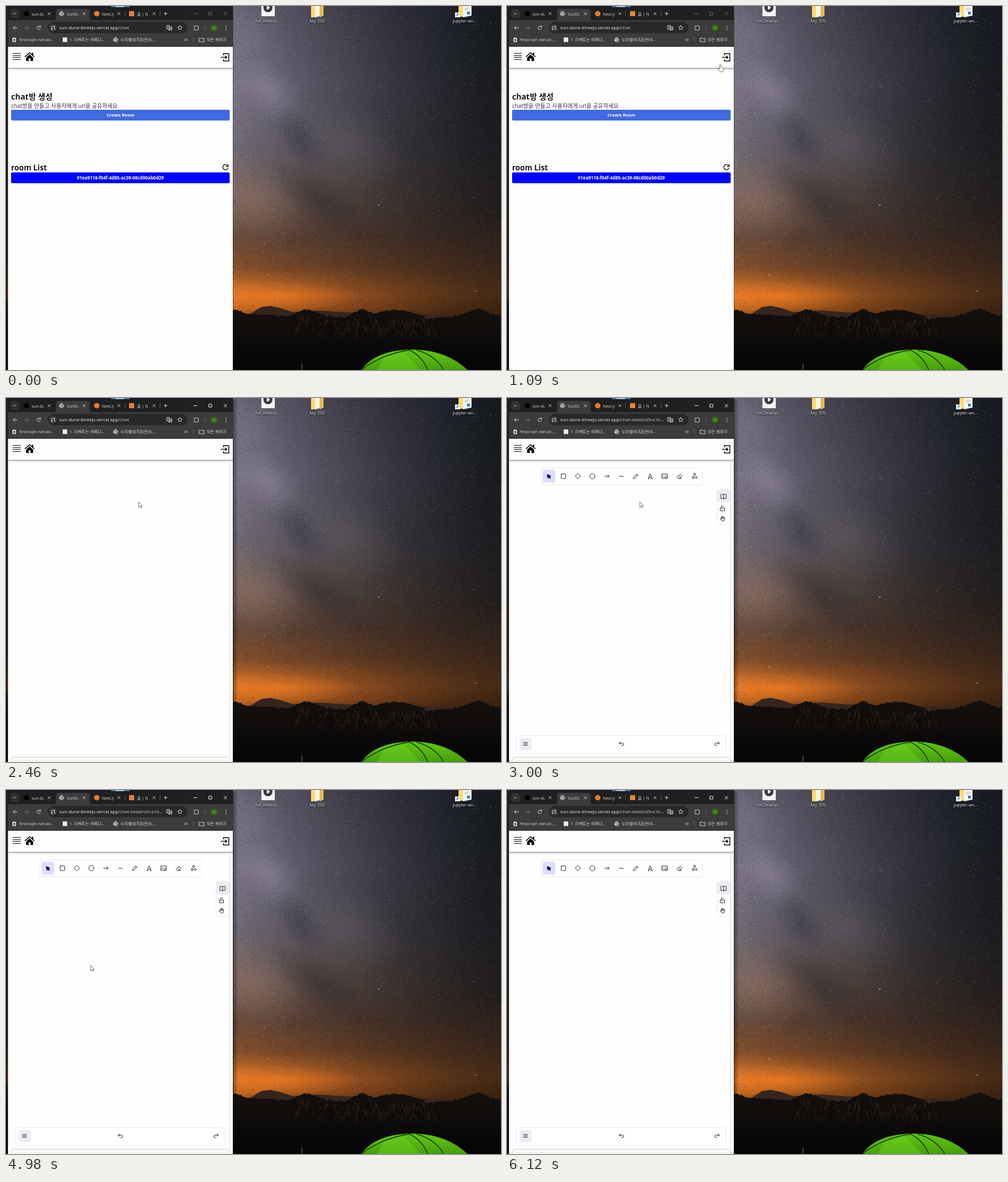
Animation of 873x642 px, one loop 8000 ms. Source, as an HTML page with a canvas:

```html
<!DOCTYPE html>
<html lang="ko">
<head>
<meta charset="utf-8">
<title>Chat room whiteboard</title>
<style>
html, body { margin: 0; width: 100%; height: 100%; overflow: hidden; background: #0b0c10; }
canvas, svg { position: absolute; left: 0; top: 0; width: 873px; height: 642px; }
text { font-family: "Open Sans", "Noto Sans CJK KR", "Noto Sans CJK", sans-serif; white-space: pre; }
.line { fill: none; stroke-linecap: round; stroke-linejoin: round; }
.mid { text-anchor: middle; }
.bold { font-weight: 700; }
.tab { font-size: 7.2px; fill: #d8d8d8; }
.label { font-size: 7.3px; fill: #fff; text-anchor: middle; text-shadow: 0 1px 1px #000, 0 0 2px #000; }
.card { fill: #fff; filter: drop-shadow(0 .5px 1.2px #0003); }
</style>
</head>
<body>
<canvas id="wallpaper" width="873" height="642"></canvas>
<svg viewBox="0 0 873 642">
  <defs>
    <linearGradient id="edge"><stop stop-color="#000" stop-opacity=".4"/><stop offset="1" stop-color="#000" stop-opacity="0"/></linearGradient>
    <linearGradient id="drop" x2="0" y2="1"><stop stop-color="#8a8a8a"/><stop offset=".3" stop-color="#c4c4c4"/><stop offset="1" stop-color="#fefefe"/></linearGradient>
    <clipPath id="tabA"><rect x="44" y="5" width="23" height="18"/></clipPath>
    <clipPath id="tabB"><rect x="106" y="5" width="22" height="18"/></clipPath>
    <clipPath id="tabC"><rect x="168" y="5" width="22" height="18"/></clipPath>
    <clipPath id="tabD"><rect x="230" y="5" width="21" height="18"/></clipPath>
    <g id="close" class="line" stroke="#d4d4d4"><path d="M-2-2L2 2M2-2L-2 2"/></g>
    <g id="globe"><circle r="4.3" fill="#c9cbd0"/><path d="M-3.5-1C-1-3 0 0 2-1S3-3 1-4M-2 3.5C-1 1 2 3 3.5 1" class="line" stroke="#55585d" stroke-width="1.2"/></g>
  </defs>

  <!-- desktop -->
  <path d="M450.500 0H474V18H450.500Z" fill="#f5f5f5"/>
  <circle cx="462" cy="3" r="8" fill="#343a43"/><path d="M460-1L466 3L460 7Z" fill="#fff"/>
  <path d="M538 0H546V20H538Z" fill="#ffd869"/><path d="M545 0H558V17L545 20Z" fill="#f4f4f1"/><path d="M553 0H560V17L553 20Z" fill="#e9bd4f"/>
  <path d="M798 0H807V19H798Z" fill="#ffd869"/><path d="M806 0H821V17L806 20Z" fill="#f4f4f1"/>
  <rect x="813" y="10" width="5" height="5" fill="#2584d0"/><path d="M809 4H817M809 7H815" stroke="#9aa"/>
  <rect x="792" y="11.500" width="8.500" height="8.500" fill="#fff"/><path d="M794 18Q794 14.500 798 14.500M796 12.700L798.500 14.500L796 16.500" class="line" stroke="#1769c0"/>
  <text class="label" x="462" y="29">file_exampl...</text>
  <text class="label" x="549" y="29">key 관리</text>
  <text class="label" x="809" y="29">jupyter-wo...</text>
  <path d="M185 0H218V2H185Z" fill="#3b78b5"/><path d="M193 0H208V2H193Z" fill="#a9c8e4"/>
  <rect id="shade" x="400" y="2" width="9" height="537" fill="url(#edge)"/>

  <!-- browser -->
  <rect x="3.500" y="2" width="397" height="640" fill="#1f2020"/>
  <rect x="7" y="6" width="16" height="15" rx="5" fill="#303131"/>
  <path d="M13 12.500L15 14.500L17 12.500" class="line" stroke="#ddd"/>
  <path d="M85 25Q88.500 25 88.500 21V9Q88.500 5 93 5H143Q147.500 5 147.500 9V21Q147.500 25 151 25Z" fill="#3c3c3c"/>
  <circle cx="36" cy="13.500" r="4.800" fill="#000"/>
  <use href="#globe" x="98" y="13.500"/>
  <circle cx="160" cy="13.500" r="4.800" fill="#e8772e"/>
  <rect x="217" y="9" width="9" height="9" fill="#ee8030"/>
  <g class="tab">
    <text x="45" y="16.500" clip-path="url(#tabA)">sun-dune</text>
    <text x="107" y="16.500" clip-path="url(#tabB)">SunDune</text>
    <text x="169" y="16.500" clip-path="url(#tabC)">Next.js</text>
    <text x="231" y="16.500" clip-path="url(#tabD)">홈 | Nu</text>
  </g>
  <use href="#close" x="76" y="13.500"/><use href="#close" x="138" y="13.500"/><use href="#close" x="199" y="13.500"/><use href="#close" x="261" y="13.500"/>
  <path d="M209.500 9V18M271.500 9V18" stroke="#555"/>
  <path d="M278.500 13.500H284.500M281.500 10.500V16.500" stroke="#ddd"/>
  <path id="controls" d="M331 13.500H337M358 11H363V16H358ZM384.500 11L389.500 16M389.500 11L384.500 16" class="line"/>

  <rect x="3.500" y="25" width="397" height="47" fill="#3c3c3c"/>
  <rect x="74" y="28" width="246" height="20" rx="10" fill="#282828"/>
  <g class="line" stroke="#d6d6d6">
    <path d="M20 38.500H13M16 35.500L13 38.500L16 41.500"/>
    <path d="M33 38.500H40M37 35.500L40 38.500L37 41.500" stroke="#777"/>
    <path d="M60.500 36.500A3.200 3.200 0 1 0 61 39.500M61 34.500V37H58.500"/>
  </g>
  <circle cx="83" cy="38.300" r="6.500" fill="#3c3c3c"/>
  <path d="M79.500 36.500H82M84.500 40.500H87M85.200 36.500h.1M80.700 40.500h.1" class="line" stroke="#eee"/>
  <circle cx="85" cy="36.500" r="1.200" fill="none" stroke="#eee" stroke-width=".8"/><circle cx="81" cy="40.500" r="1.200" fill="none" stroke="#eee" stroke-width=".8"/>
  <text x="94" y="41.200" font-size="8" fill="#f2f2f2">sun-dune-threejs.vercel.app<tspan id="path" fill="#c8c8c8"></tspan></text>
  <g class="line" stroke="#d6d6d6" stroke-width=".9">
    <path d="M283.500 34.500H288.500V40.500H283.500ZM288.500 36.500H292.500V42.500H286.500V40.500M285 36.500H287M285 38.500H287M289.500 41L290.500 38L291.500 41"/>
    <path d="M306.500 34.200L307.700 36.800L310.500 37.100L308.400 39L309 41.800L306.500 40.400L304 41.800L304.600 39L302.500 37.100L305.300 36.800Z"/>
    <path d="M332 35.500H334.500Q335.500 33 336.500 35.500H339V38Q341.500 39 339 40V42.500H332V40Q334 39 332 38Z"/>
  </g>
  <path d="M351.500 34V43M330.500 55V64" stroke="#666"/>
  <circle cx="367" cy="38.300" r="5.800" fill="#2f6d12"/><text class="mid" x="367" y="40.600" font-size="6.500" fill="#9ee060">cc</text>
  <path d="M388 35.200h.1M388 38.300h.1M388 41.400h.1" class="line" stroke="#ddd" stroke-width="1.6"/>
  <rect x="11.500" y="56" width="6" height="7.500" rx="1" fill="#f2f2f2"/><path d="M13 58H16V62H13Z" fill="#555"/>
  <rect x="100" y="55.500" width="8" height="8" fill="#eee"/>
  <use href="#globe" x="193.500" y="59.500"/>
  <g class="tab">
    <text x="23" y="62.300">firsol-vpn.narubi...</text>
    <text x="112" y="62.300">1. 리액트는 어쩌다...</text>
    <text x="202" y="62.300">누리별테크온(전사...</text>
    <text x="354" y="62.300">모든 북마크</text>
  </g>
  <g class="line" stroke="#d6d6d6"><path d="M315 57.500L317 59.500L315 61.500M318 57.500L320 59.500L318 61.500M341 56.500H344L345 57.500H349.500V63H341Z"/></g>

  <!-- page -->
  <rect x="3.500" y="72" width="396.500" height="570" fill="#fefefe"/>
  <rect x="3.500" y="109" width="396.500" height="4" fill="url(#drop)"/>
  <path d="M12 83.500H26M12 87.500H26M12 90.500H26M12 94.500H26" stroke="#111" stroke-width="1.200"/>
  <path d="M33 89L41.500 81.500L45.500 85V82.500H48V87L50.500 89L49.500 90.300L41.500 83.500L34 90.300Z"/><path d="M35.500 91L41.500 85.500L47.800 91V97H43.300V92.500H40V97H35.500Z"/>
  <path d="M383.500 87V84H393V97H383.500V94M379 90.500H389M386.500 87.500L389.500 90.500L386.500 93.500" fill="none" stroke="#111" stroke-width="1.500"/>

  <g id="lobby">
    <text class="bold" x="9" y="164.500" font-size="14" fill="#191919">chat방 생성</text>
    <text x="9" y="179.500" font-size="9.900" fill="#333">chat방을 만들고 사용자에게 url을 공유하세요</text>
    <rect id="create" x="9" y="183" width="385.500" height="19" rx="2"/>
    <text class="mid bold" x="201.700" y="195.300" font-size="7.600" fill="#fff">Create Room</text>
    <text class="bold" x="9" y="289.500" font-size="13.400" fill="#191919">room List</text>
    <path d="M390.500 281.300A4.600 4.600 0 1 0 391.500 285M391.700 279V282.800H387.800" fill="none" stroke="#111" stroke-width="1.400"/>
    <rect x="9" y="293.500" width="385.500" height="19" rx="2" fill="#00f"/>
    <text class="mid bold" x="201.700" y="305.800" font-size="7.900" fill="#fff">91ea9118-f04f-4d85-ac39-08cd00ab0d29</text>
  </g>

  <g id="room">
    <path d="M394.500 113V633" stroke="#ddd"/>
    <rect x="9.500" y="633.500" width="385" height="20" rx="3" fill="#fafafa" stroke="#ccc"/>
    <rect x="14.500" y="640" width="375" height="14" rx="3" fill="#fff" stroke="#ddd"/>
  </g>
  <text id="loading" class="mid" x="202" y="417.500" font-size="7.400" fill="#888">Loading scene...</text>

  <g id="board">
    <rect class="card" x="60" y="124" width="284" height="28.500" rx="4"/>
    <rect x="62.500" y="126.500" width="23" height="23" rx="4" fill="#e0dfff"/>
    <path d="M318 132V144" stroke="#f0f0f0"/>
    <g class="line" stroke="#222" stroke-width=".95">
      <path d="M71 135L77.500 137.500L74.800 138.700L77 141.500L76 142.200L73.900 139.500L72.500 141.500Z" fill="#030064" stroke="#030064"/>
      <rect x="95.500" y="134" width="8" height="8" rx="1"/>
      <path d="M125 133.300L129.700 138L125 142.700L120.300 138Z"/>
      <circle cx="150.500" cy="138" r="4.500"/>
      <path d="M172 138H180M177.500 135.500L180 138L177.500 140.500M198 138H205.500"/>
      <path d="M223 142L223.700 139L229 133.800L231 135.800L225.700 141.300ZM227.500 135.300L229.500 137.300"/>
      <path d="M249.500 142L252 134H253L255.700 142M250.500 139.500H254.500M248.800 142H251M254 142H256.500"/>
      <path d="M273.500 134H282.500V142H273.500ZM273.500 140L276.500 137.500L280 141M279 139.500L280.500 138.500L282.500 140.500M279.500 136.300h.1"/>
      <path d="M302 142L299.700 139.700L305 134.300L308.500 137.700L304.300 142ZM302.500 137L306 140.300M304 142H308"/>
      <path d="M331 132.500L333 135.800H329ZM327.300 138.500H330V141.500H327.300Z"/><circle cx="333.700" cy="140" r="1.600"/>
    </g>
    <rect class="card" x="371" y="162" width="23" height="60" rx="4"/>
    <rect x="370.500" y="161.500" width="23.500" height="23" rx="4" fill="#ececf4"/>
    <g class="line" stroke="#222" stroke-width=".95">
      <path d="M382 170.500V178M377.500 170Q380 169.300 382 170.500Q384 169.300 386.700 170V177Q384 176.300 382 177.800Q380 176.300 377.500 177Z"/>
      <path d="M376.500 194H383.500V199H376.500ZM378 194V192Q378 190 380 190Q381.500 190 381.800 191.300M380 196.500h.1"/>
      <path d="M377.800 213V210.300Q378.500 209.500 379 210.300V209Q380 208 380.700 209V209.500Q381.700 208.800 382.300 210V210.500Q383.700 210 383.800 211.500V214Q383.500 217.300 380.500 217.300Q378.500 217.300 376 213.500Q376.500 212 377.800 213ZM379 210.300V212.500M380.700 209.500V212.500M382.300 210.500V212.500"/>
    </g>
    <rect class="card" x="17" y="596" width="369" height="30" rx="4"/>
    <rect x="22" y="600" width="21" height="21" rx="4" fill="#ececf4"/>
    <path d="M29 607.500H36M29 610H36M29 612.500H36" class="line" stroke="#222" stroke-width=".9"/>
    <path d="M200 606.500L198 608.700L200 611M198 608.700H203.500Q205.800 608.700 205.800 610.800T203.500 613H202M372.300 606.500L374.300 608.700L372.300 611M374.300 608.700H368.800Q366.500 608.700 366.500 610.800T368.800 613H370" class="line" stroke="#222"/>
  </g>

  <g id="cursor" fill="#fff" stroke="#3a3a3a" stroke-width=".7" stroke-linejoin="round">
    <path id="arrow" d="M.3.300V9.800L2.400 7.800L3.900 11L5.300 10.400L3.900 7.300H6.900Z"/>
    <path id="hand" d="M-1 8V1Q0-.500 1.200 1V5Q2.500 4.300 3 5.500Q4.300 4.800 4.700 6Q6 5.500 6 7V9Q6 11 4.800 13H0Q-1.500 11-4 8Q-3.500 6-1 8Z"/>
  </g>
</svg>
<script>
const LOOP = 8000, STEP = 1000 / 15;
const el = id => document.getElementById(id);
const show = (id, on) => { el(id).style.display = on ? "" : "none"; };

let seed = 7;
const rand = () => (seed = (seed * 16807) % 2147483647) / 2147483647;

function paintWallpaper() {
  const c = el("wallpaper").getContext("2d");
  const poly = (fill, pts) => {
    c.fillStyle = fill;
    c.beginPath();
    pts.forEach(p => c.lineTo(...p));
    c.fill();
  };
  const vertical = (top, bottom, stops) => {
    const g = c.createLinearGradient(0, top, 0, bottom);
    stops.forEach(([at, colour]) => g.addColorStop(at, colour));
    return g;
  };
  const glow = (x, y, rx, ry, tilt, rgb, alpha) => {
    c.save();
    c.translate(x, y); c.rotate(tilt); c.scale(rx, ry);
    const g = c.createRadialGradient(0, 0, 0, 0, 0, 1);
    g.addColorStop(0, `rgba(${rgb},${alpha})`);
    g.addColorStop(.5, `rgba(${rgb},${alpha * .45})`);
    g.addColorStop(1, `rgba(${rgb},0)`);
    c.fillStyle = g;
    c.fillRect(-1, -1, 2, 2);
    c.restore();
  };

  // dark night sky, with the bright side fading out to the right
  c.fillStyle = vertical(0, 550, [[0, "#15181e"], [.4, "#191b20"], [.65, "#221d1c"], [.8, "#33231a"], [.92, "#472a16"], [1, "#35200f"]]);
  c.fillRect(0, 0, 873, 642);
  c.fillStyle = vertical(0, 550, [[0, "#676274"], [.25, "#7c768a"], [.45, "#716b76"], [.62, "#7a645c"], [.74, "#66493a"],
    [.84, "#87502a"], [.89, "#c26a28"], [.93, "#e37826"], [.97, "#c8681f"], [1, "#8c4a1a"]]);
  for (let x = 400; x < 873; x++) {
    c.globalAlpha = (1 - (x - 400) / 473) ** 1.3;
    c.fillRect(x, 0, 1, 550);
  }
  c.globalAlpha = 1;
  glow(465, 150, 75, 45, .8, "170,162,182", .35);
  glow(430, 50, 90, 60, .9, "150,145,170", .2);
  glow(600, 245, 110, 75, .5, "120,108,110", .35);
  glow(440, 350, 90, 75, .7, "160,125,108", .35);
  glow(520, 235, 70, 35, 1, "45,48,66", .45);
  glow(555, 345, 110, 45, .6, "28,27,32", .4);
  glow(475, 512, 150, 28, 0, "245,125,32", .7);

  // star dust
  for (let i = 0; i < 32000; i++) {
    const x = 400 + 473 * rand() ** 1.3, y = rand() * 535;
    c.fillStyle = rand() < .5 ? `rgba(225,215,225,${.2 * rand()})` : `rgba(8,8,14,${.3 * rand()})`;
    c.fillRect(x | 0, y | 0, 1, 1);
  }
  for (let i = 0; i < 420; i++) {
    c.fillStyle = `rgba(235,225,225,${.1 + .45 * rand() ** 2})`;
    c.fillRect(400 + rand() * 473, rand() * 470, 1.2, 1);
  }
  c.fillStyle = "#7d8fd8"; c.fillRect(656, 350, 3, 2);
  c.fillStyle = "#c98a58"; c.fillRect(461, 473, 2, 2); c.fillRect(828, 502, 2, 2);

  poly("#35251f", [[415, 560], [434, 541], [450, 531], [466, 529], [485, 533], [505, 540], [550, 537], [610, 541], [690, 543], [873, 547], [873, 570]]);
  const ridge = [[400, 535], [430, 543], [470, 546], [505, 545], [528, 534], [548, 541], [570, 548], [600, 549], [626, 534],
    [648, 542], [672, 537], [702, 536], [724, 544], [745, 551], [785, 548], [812, 541], [833, 533], [852, 541], [873, 546]];
  const rough = [[400, 642]];
  ridge.slice(1).forEach(([x, y], i) => {
    const [px, py] = ridge[i];
    for (let k = 0; k < 1; k += .12) rough.push([px + (x - px) * k, py + (y - py) * k + rand() * 3 - 1.5]);
  });
  poly(vertical(530, 642, [[0, "#14100e"], [.45, "#0f0c0b"], [.7, "#090808"], [1, "#060606"]]), [...rough, [873, 642]]);
  for (let i = 0; i < 170; i++) {
    const x = 505 + rand() * 255, y = 545 + rand() * 30;
    poly(`rgba(${rand() < .6 ? "78,54,40" : "0,0,0"},.3)`, [[x, y], [x + 3, y + 2], [x + rand() * 14 - 5, y + 8 + rand() * 14]]);
  }

  // tent
  c.fillStyle = vertical(606, 642, [[0, "#5fc414"], [.5, "#54b40f"], [1, "#479d0c"]]);
  c.beginPath();
  c.moveTo(627, 642);
  c.bezierCurveTo(645, 614, 685, 606, 715, 606);
  c.bezierCurveTo(765, 606, 795, 624, 814, 642);
  c.fill();
  poly("#74d42466", [[665, 621], [702, 611], [732, 642], [655, 642]]);
  c.strokeStyle = "#173606"; c.lineWidth = 1.4;
  c.stroke(new Path2D("M628 641Q665 613 712 607Q734 618 744 642M724 607Q756 615 772 642"));
  c.fillStyle = "#7a4a28"; c.fillRect(521, 631, 1.5, 11);

  c.fillStyle = vertical(0, 642, [[0, "#20212b"], [.3, "#14151b"], [.7, "#1c1411"], [.79, "#3a2114"], [.83, "#0c0909"], [1, "#050505"]]);
  c.fillRect(0, 0, 4, 642);
}

// Pointer strokes: start time, number of moves after the first, evenly timed points.
const strokes = [
  [190, 10, [[788, 595], [640, 430], [500, 300], [405, 215], [386, 150], [377, 98]]],
  [1020, 9, [[383, 90], [376, 103], [352, 125], [322, 145], [292, 162], [268, 174], [250, 182], [240, 187], [236, 185], [234, 183]]],
  [3950, 11, [[245, 194], [260, 235], [264, 290], [259, 345], [247, 395], [238, 411]]],
  [4780, 11, [[225, 395], [200, 365], [172, 334], [149, 309], [149, 285], [155, 255], [166, 225], [180, 195], [196, 168], [210, 149], [217, 140], [220, 146]]],
  [5640, 4, [[235, 200], [262, 315], [288, 435], [308, 550], [323, 639]]]
];

function pointerAt(t) {
  const stroke = strokes.filter(s => s[0] <= t).pop();
  if (!stroke || t >= 6120) return null;
  const [start, moves, pts] = stroke;
  const move = Math.min(moves, Math.floor((t - start) / STEP + .05));
  const u = move / moves * (pts.length - 1);
  const i = Math.min(pts.length - 2, Math.floor(u));
  return pts[i].map((v, axis) => v + (pts[i + 1][axis] - v) * (u - i));
}

function render(t) {
  const active = t >= 1930, inRoom = t >= 2460, ready = t >= 3000;
  show("lobby", !inRoom);
  show("room", inRoom);
  show("loading", t >= 2800 && !ready);
  show("board", ready);
  show("shade", active);
  el("controls").style.stroke = active ? "#f2f2f2" : "#6c6c6c";
  el("path").textContent = t < 2530 ? "/chat" : "/chat-detail/d5ce1b...";

  const p = pointerAt(t);
  show("cursor", p);
  const [x, y] = p || [-99, -99];
  el("create").style.fill = x > 9 && x < 394 && y > 182 && y < 202 ? "#3159d6" : "#4169e1";
  const hand = ready ? y < 152 : x > 370 && y < 109;
  show("hand", hand);
  show("arrow", !hand);
  el("cursor").setAttribute("transform", `translate(${Math.round(x)} ${Math.round(y)})`);
}

paintWallpaper();
const begin = performance.now();
function tick() {
  render((performance.now() - begin) % LOOP);
  requestAnimationFrame(tick);
}
tick();
</script>
</body>
</html>
```
